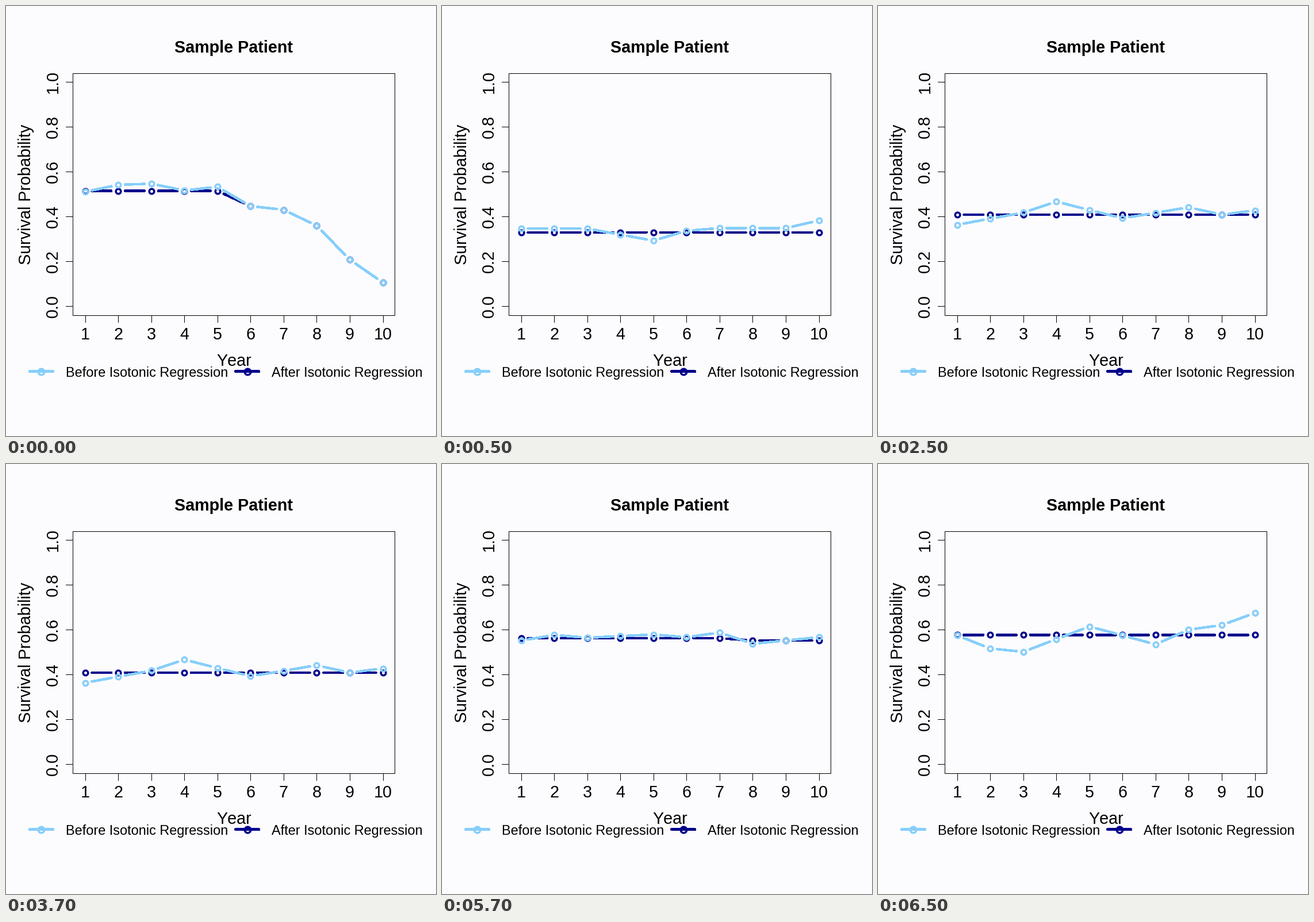
Write a matplotlib script that moves like this. It is 748x748 px and loops after 8000 ms.

```python
import numpy as np
import matplotlib.pyplot as plt
from matplotlib.animation import FuncAnimation

SIZE, DPI = 748, 100
PX = 72 / DPI  # points per pixel
LIGHT, DARK, PAPER = "#87CEFA", "#00008B", "#FCFCFE"
STEP_MS, STEPS = 500, 16
HOLD = 4  # steps each patient stays on screen
GAP, LINE = 12, 3.5

plt.rcParams["font.family"] = "Liberation Sans"
plt.rcParams["text.kerning_factor"] = 6  # practically no kerning

YEARS = np.arange(1, 11)


def x_px(year):
    return 137.6 + 57.55 * (year - 1)


def y_px(prob):
    return 521.7 - 390 * prob


def patient(level, turns, flat_until=10, fall=0):
    """Before: straight runs between turning points, less a late S-shaped fall.
    After: a flat level, then the best non-increasing fit."""
    before = np.interp(YEARS, list(turns), list(turns.values()))
    before -= fall / (1 + np.exp(-1.72 * (YEARS - 8.67)))
    after = non_increasing(np.where(YEARS <= flat_until, level, before))
    return before, after


def non_increasing(values):
    n = len(values)
    return np.array([min(max(values[a:b].mean() for b in range(i + 1, n + 1))
                         for a in range(i + 1)) for i in range(n)])


PATIENTS = [
    patient(0.513, {1: .509, 2: .54, 3: .545, 4: .515, 5: .532, 6: .449},
            flat_until=5, fall=0.38),
    patient(0.328, {1: .345, 3: .345, 5: .291, 6: .335, 7: .347, 9: .347,
                    10: .381}),
    patient(0.407, {1: .362, 3: .416, 4: .465, 6: .391, 8: .44, 9: .407,
                    10: .426}),
    patient(0.561, {1: .55, 2: .575, 3: .563, 5: .577, 6: .565, 7: .586,
                    8: .536, 10: .565}, flat_until=7),
    patient(0.575, {1: .573, 2: .515, 3: .5, 5: .613, 7: .533, 8: .599,
                    9: .619, 10: .673}),
]

fig = plt.figure(figsize=(SIZE / DPI, SIZE / DPI), dpi=DPI, facecolor=PAPER)
ax = fig.add_axes([0, 0, 1, 1])
ax.set(xlim=(0, SIZE), ylim=(SIZE, 0))
ax.axis("off")


def rule(xs, ys):
    ax.plot(xs, ys, color="black", lw=PX, solid_capstyle="projecting",
            solid_joinstyle="miter", snap=True, antialiased=False)


def label(x, y, text, size=28.8, **kw):
    kw = {"ha": "center", **kw}
    ax.text(x, y, text, fontsize=size * PX, va="baseline",
            rotation_mode="anchor", color="black", **kw)


def stroke(color):
    return ax.plot([], [], color=color, lw=LINE * PX, antialiased=False,
                   solid_capstyle="round", snap=False)[0]


def rings(color, diameter):
    return ax.plot([], [], "o", ms=diameter * PX, mfc="none", mec=color,
                   mew=LINE * PX, antialiased=False, snap=False)[0]


def broken_line(xs, ys):
    """Segments between neighbouring points, stopping short of each point."""
    points = np.column_stack([xs, ys])
    a, b = points[:-1], points[1:]
    delta = b - a
    trim = GAP * delta / np.hypot(*delta.T)[:, None]
    blank = np.full_like(a, np.nan)
    return np.stack([a + trim, b - trim, blank], axis=1).reshape(-1, 2).T


def draw_frame():
    left, right, top, bottom = 116.5, 676.5, 116.5, 537.5
    rule([left, right, right, left, left], [top, top, bottom, bottom, top])
    for year in YEARS:
        x = x_px(year)
        rule([x, x], [bottom, bottom + 12])
        label(x, 580.3, str(year))
    for prob in np.arange(6) / 5:
        y = y_px(prob)
        rule([left - 12, left], [y, y])
        label(89.5, y, f"{prob:.1f}", rotation=90)
    label(396.5, 81, "Sample Patient", weight="bold")
    label(396.5, 626.3, "Year")
    label(43.5, 327.5, "Survival Probability", rotation=90)


def draw_legend():
    entries = [(61.5, 104, "Before Isotonic Regression", LIGHT),
               (419.8, 462.5, "After Isotonic Regression", DARK)]
    for x, text_x, text, color in entries:
        stroke(color).set_data([x - 20.5, x + 20.5], [635.6, 635.6])
        rings(color, 10.5).set_data([x], [635.6])
        label(text_x, 645.3, text, size=23.5, ha="left")


draw_frame()
draw_legend()
after_art = stroke(DARK), rings(DARK, 8.6)
before_art = stroke(LIGHT), rings(LIGHT, 8.6)


def update(step):
    shown = PATIENTS[(step + HOLD - 1) // HOLD]
    for (line, dots), probs in zip((before_art, after_art), shown):
        xs, ys = x_px(YEARS), y_px(probs)
        line.set_data(*broken_line(xs, ys))
        dots.set_data(xs, ys)
    return *after_art, *before_art


animation = FuncAnimation(fig, update, frames=STEPS, interval=STEP_MS,
                          repeat=True, repeat_delay=0)
plt.show()
```
